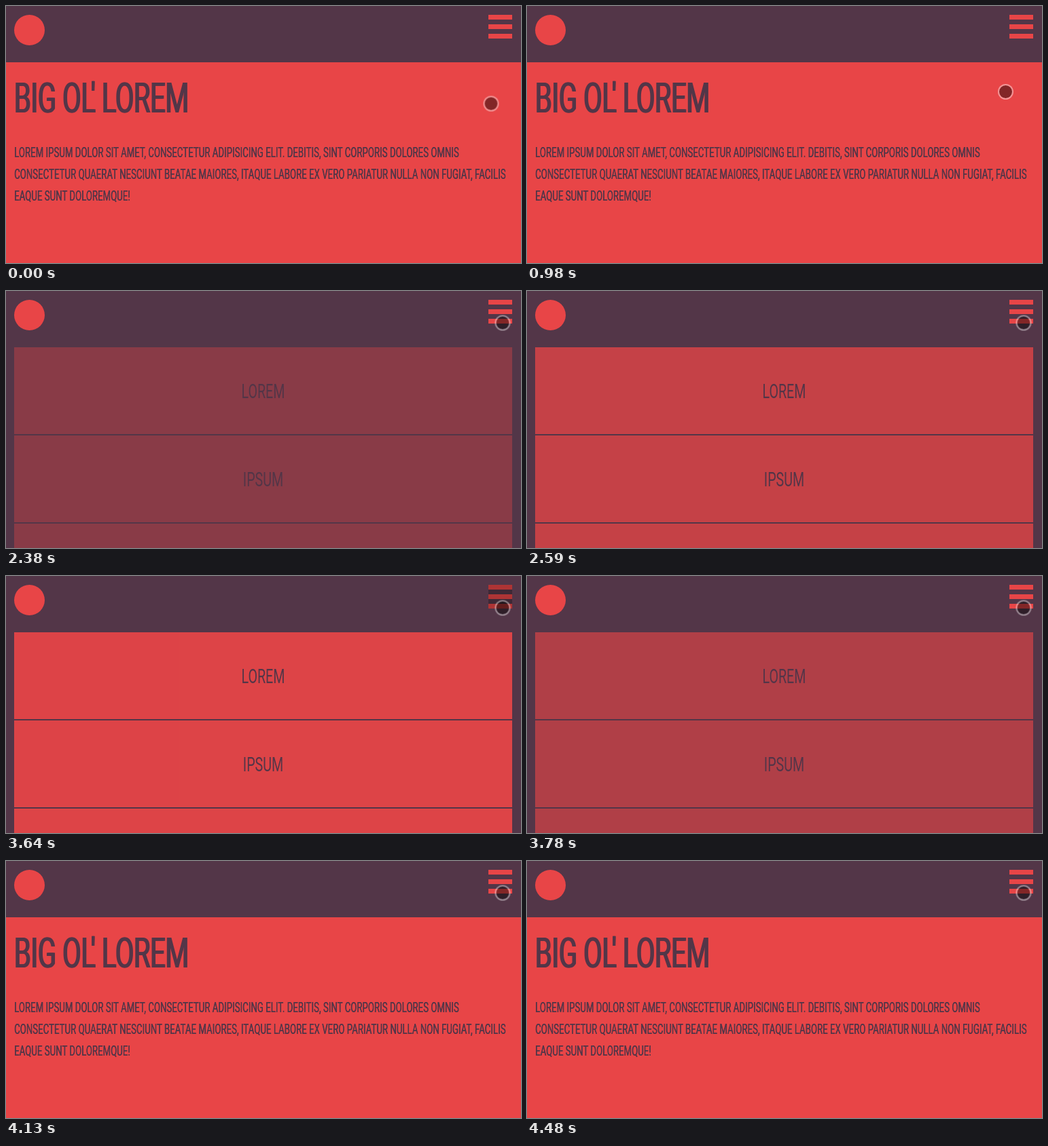
These frames come from a looping animation (758x379 px, 4.76 s). An HTML page:

```html
<!DOCTYPE html>
<html lang="la">
<head>
<meta charset="utf-8">
<title>Menu fade</title>
<style>
  :root { --red: #e84547; --plum: #533648; --loop: 4760ms; }
  html, body { margin: 0; width: 100%; height: 100%; overflow: hidden; background: var(--red); }
  .stage { position: relative; width: 758px; height: 379px; overflow: hidden; background: var(--red); }
  .stage * { position: absolute; box-sizing: border-box; margin: 0; }

  /* One condensed face for all type */
  .type {
    font-family: Roboto, "Liberation Sans", sans-serif;
    color: var(--plum);
    white-space: pre;
    transform: scaleX(.655);
    transform-origin: 0 50%;
  }
  h1 { left: 10.5px; top: 99px; font-size: 61px; font-weight: 400; line-height: 74px;
       letter-spacing: -.01em; text-shadow: .045em 0 currentColor; }
  p  { left: 12px; top: 200px; font-size: 20px; line-height: 32px;
       letter-spacing: .006em; text-shadow: .03em 0 currentColor; }

  .header { width: 758px; height: 83px; background: var(--plum); }
  .logo { left: 12px; top: 13px; width: 45px; height: 45px; border-radius: 50%; background: var(--red); }
  .burger { left: 710px; top: 13px; width: 35px; height: 35px;
            background: repeating-linear-gradient(var(--red) 0 7px, transparent 7px 14px); }
  .press { inset: 0; background: rgba(0, 0, 0, .25); }

  .menu { top: 83px; width: 758px; height: 296px; background: var(--plum); }
  .rows { inset: 0; }
  .row { left: 12px; width: 733px; height: 128px; background: var(--red); }
  .row:nth-child(2) { top: 130px; }
  .row:nth-child(3) { top: 260px; }
  .row .type { inset: 0; transform-origin: 50% 50%; text-align: center; font-size: 30px; line-height: 129px; }

  .cursor { width: 23px; height: 23px; margin: -11.5px; border-radius: 50%;
            border: 2px solid rgba(255, 255, 255, .43);
            background: rgba(0, 0, 0, .44) padding-box; }

  .press, .menu, .rows, .cursor { animation: var(--loop) step-end -2ms infinite; }
  .press  { animation-name: press; }
  .menu   { animation-name: show; }
  .rows   { animation-name: fade; }
  .cursor { animation-name: travel; }

  @keyframes press {
    0%, 50%, 79.412% { opacity: 0; }
    47.059%, 76.471% { opacity: 1; }
    100% { opacity: 0; }
  }
  @keyframes show {
    0%, 86.765%, 100% { visibility: hidden; }
    47.059% { visibility: visible; }
  }
  @keyframes fade {
    0%      { opacity: 0; }
    47.059% { opacity: .1; animation-timing-function: steps(5); }
    54.412% { opacity: .77; }
    55.882% { opacity: 1; }
    76.471% { opacity: .93; animation-timing-function: steps(6); }
    85.294% { opacity: .03; }
    86.765%, 100% { opacity: 0; }
  }
  @keyframes travel {
    0%      { transform: translate(713.5px, 143.5px); }
    16.176% { transform: translate(713.5px, 143.5px); animation-timing-function: steps(3); }
    20.588% { transform: translate(704px, 126px); animation-timing-function: steps(3); }
    25%     { transform: translate(695.5px, 101px); animation-timing-function: steps(2); }
    27.941% { transform: translate(699.5px, 78.5px); animation-timing-function: steps(3); }
    32.353% { transform: translate(717px, 58px); animation-timing-function: steps(3); }
    36.765%, 100% { transform: translate(730.5px, 46.5px); }
  }
</style>
</head>
<body>
<div class="stage">
  <h1 class="type">BIG OL' LOREM</h1>
  <p class="type">LOREM IPSUM DOLOR SIT AMET, CONSECTETUR ADIPISICING ELIT. DEBITIS, SINT CORPORIS DOLORES OMNIS
CONSECTETUR QUAERAT NESCIUNT BEATAE MAIORES, ITAQUE LABORE EX VERO PARIATUR NULLA NON FUGIAT, FACILIS
EAQUE SUNT DOLOREMQUE!</p>
  <div class="header">
    <div class="logo"></div>
    <div class="burger"><div class="press"></div></div>
  </div>
  <div class="menu">
    <div class="rows">
      <div class="row"><span class="type">LOREM</span></div>
      <div class="row"><span class="type">IPSUM</span></div>
      <div class="row"></div>
    </div>
  </div>
  <div class="cursor"></div>
</div>
</body>
</html>
```
